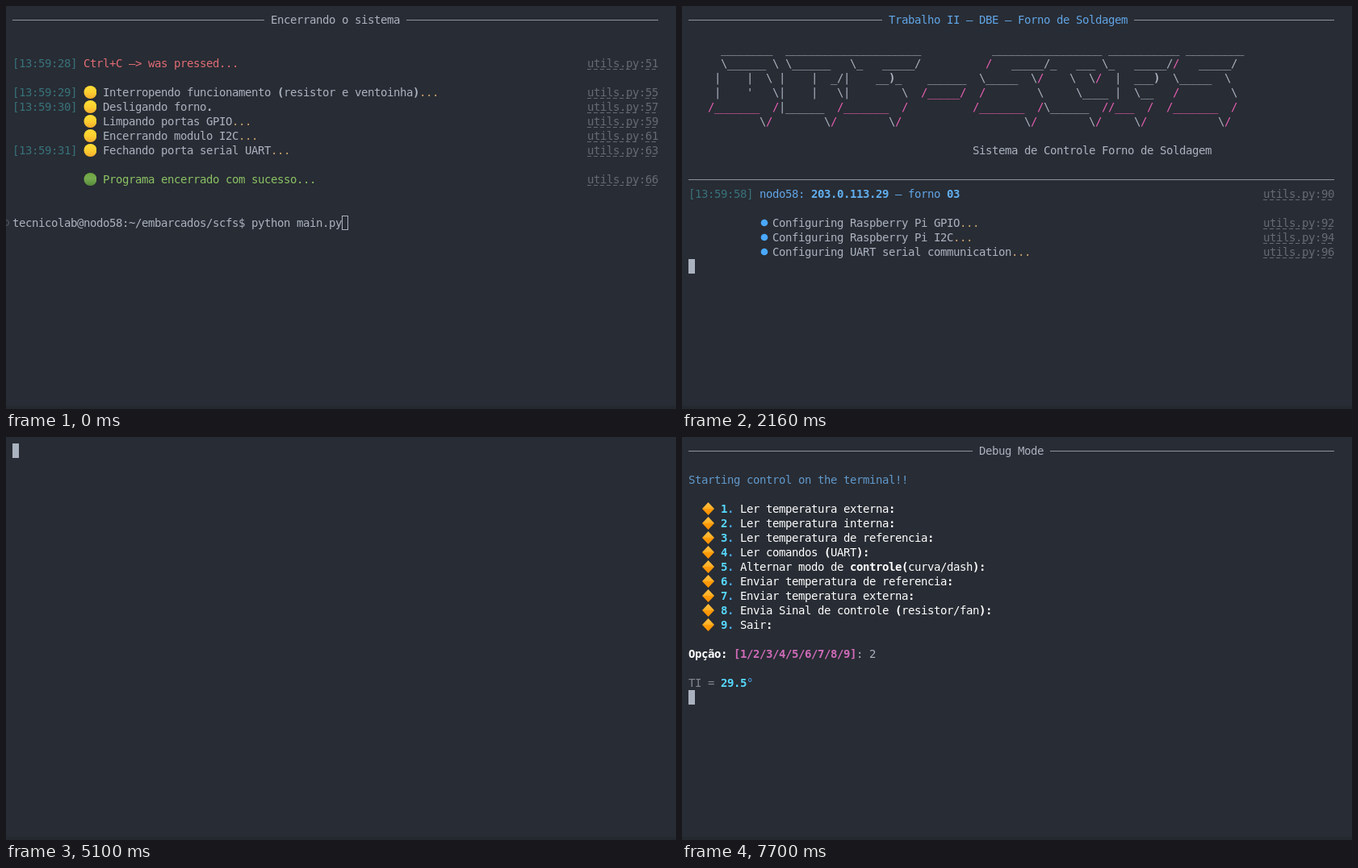
Recreate the animation shown at these times as an HTML page. Size 830 px wide and 500 px high, loop 8 s.

```html
<!DOCTYPE html>
<html lang="pt">
<head>
<meta charset="utf-8">
<title>Terminal</title>
<style>
html, body { margin: 0; width: 100%; height: 100%; overflow: hidden; background: #282c34; }
#term {
  position: absolute; left: 0; top: 0; width: 830px; height: 500px; overflow: hidden;
  color: #abb2bf; background: linear-gradient(#282c34 496px, #24282f 496px);
  font: 14px/18px "DejaVu Sans Mono", monospace;
}
#term > div { position: absolute; height: 18px; white-space: pre; letter-spacing: calc(8px - 1ch); }
#term .rule { height: 1px; background: #8d939d; }
#term .mark { left: -4px; top: 265px; width: 6px; height: 6px; border: 1px solid #59606c; border-radius: 50%; }
#cursor { width: 8px; background: #abb2bf; }
#cursor.hollow { background: none; box-shadow: inset 0 0 0 1px #abb2bf; }

.time { color: #38727b; }
.red { color: #e06c75; }
.green { color: #8cc265; }
.ready { color: #67b35c; }
.dots { color: #c9a26d; }
.blue { color: #61a5e6; }
.soft { color: #6199cb; }
.pink { color: #e85fb4; }
.white { color: #fff; }
.dim { color: #82868d; }
.bold, .ip, .ask, .key, .num, .opts { font-weight: bold; }
.ip { color: #61afef; }
.ask { color: #9aa1b0; }
.key, .num { color: #56d8ff; }
.deg { color: #4aa8f0; }
.opts { color: #cf6bb8; }
.file { color: #656a73; }
.link { color: #4da9fa; }
.dash {
  display: inline-block; height: 18px; vertical-align: top;
  background: repeating-linear-gradient(90deg, currentColor 0 5px, transparent 5px 8px) 0 16px / 100% 1px no-repeat;
}
i { display: inline-block; width: 16px; height: 18px; vertical-align: top; }
.ball { clip-path: circle(8px at 8.5px 9px); background: linear-gradient(#ffdc35 2px, #fdcf30 9px, #f4ad2c 17px); }
.leaf { clip-path: circle(8px at 8.5px 9px); background: linear-gradient(#6fa63f 2px, #77ab50 8px, #558a3a 17px); }
.gem { clip-path: polygon(8.5px 1px, 16px 9px, 8.5px 17px, 1px 9px); background: linear-gradient(#ffc247 1px, #ffae22 9px, #ff9c0a 9px, #f98f00 17px); }
.dot { clip-path: circle(4.3px at 6px 9px); background: #4aa8ff; }
.ok { clip-path: circle(4.3px at 6px 9px); background: #67b35c; }
</style>
</head>
<body>
<div id="term"></div>
<script>
const LOOP = 8000;
const term = document.getElementById('term');
const items = [];

// {class text} becomes a styled span, [[class]] an icon
const rich = s => s
  .replace(/\[\[(\w+)\]\]/g, '<i class="$1"></i>')
  .replace(/\{([a-z ]+):([^}]*)\}/g, '<span class="$1">$2</span>');

// spans: pairs of on and off times
function add(row, col, html, spans, cls = '') {
  const el = document.createElement('div');
  el.className = cls;
  el.style.left = 8 + col * 8 + 'px';
  el.style.top = 8 + row * 18 + 'px';
  el.innerHTML = html;
  term.append(el);
  items.push({ el, spans });
  return el;
}
const text = (row, col, s, ...spans) => add(row, col, rich(s), spans);

function line(row, from, to, spans) {
  const el = add(row, from, '', spans, 'rule');
  el.style.top = 17 + row * 18 + 'px';
  el.style.width = (to - from) * 8 + 'px';
}
function rule(row, title, cls, ...spans) {
  if (!title) return line(row, 0, 100, spans);
  const col = Math.floor((100 - title.length) / 2);
  line(row, 0, col - 1, spans);
  text(row, col, `{${cls}:${title}}`, ...spans);
  line(row, col + title.length + 1, 100, spans);
}
function log(row, time, s, num, ...spans) {
  if (time) text(row, 0, `{time:[13:59:${time}]}`, ...spans);
  text(row, 11, s.replace(/\.\.\.$/, '{dots:...}'), ...spans);
  text(row, 91 - String(num).length, `{file dash:utils.py}{file::}{file dash:${num}}`, ...spans);
}

// Shutdown screen
const A = [0, 1760];
rule(0, 'Encerrando o sistema', 'plain', ...[A]);
log(3, 28, '{red:Ctrl+C –> was pressed...}', 51, A);
log(5, 29, '[[ball]] Interropendo funcionamento {bold:(}resistor e ventoinha{bold:)}...', 55, A);
log(6, 30, '[[ball]] Desligando forno{bold:.}', 57, A);
log(7, '', '[[ball]] Limpando portas GPIO...', 59, A);
log(8, '', '[[ball]] Encerrando modulo I2C...', 61, A);
log(9, 31, '[[ball]] Fechando porta serial UART...', 63, A);
log(11, '', '[[leaf]] {green:Programa encerrado com sucesso...}', 66, A);
text(14, 0, 'tecnicolab@nodo58:~/embarcados/scfs$ python main.py', A);
add(0, 0, '', [A], 'mark').style.cssText = '';

// Setup screen
const END = 5100, B = [1840, END];
rule(0, 'Trabalho II – DBE – Forno de Soldagem', 'blue', B);
const art = String.raw`
     ________  _____________________           _________________ ___________ _________
     \______ \ \______   \_   _____/          /   _____/_   ___ \_   _____//   _____/
    |    |  \ |    |  _/|    __)_    ______  \_____  \/    \  \/  |  ___)  \_____  \
    |    '   \|    |   \|        \  /_____/  /        \     \____ |  \__   /        \
   /_______  /|______  /_______  /          /_______  /\______  //___  /  /_______  /
           \/        \/        \/                   \/        \/     \/           \/`;
art.split('\n').slice(1).forEach((s, i) => add(2 + i, 0, s
  .replace(/\B(?:\/[-\w.+]+)*\/[-\w.+]*|\)/g, m => `<span class="${m === ')' ? 'bold' : 'pink'}">${m}</span>`), [B]));
text(9, 44, 'Sistema de Controle Forno de Soldagem', B);
rule(11, '', '', B);
log(12, 58, '{blue:nodo58:} {ip:203.0.113.29} {blue:– forno} {ip:03}', 90, B);
log(14, '', '[[dot]]Configuring Raspberry Pi GPIO...', 92, [1930, END]);
log(15, '', '[[dot]]Configuring Raspberry Pi I2C...', 94, [2020, END]);
log(16, '', '[[dot]]Configuring UART serial communication...', 96, [2160, END]);
log(17, 59, '[[ok]]{ready:Ready setup...}', 98, [2340, END]);
log(19, '', '{link dash:link dashboad thingsboard}', 102, [2890, END]);
rule(20, '', '', [2890, END]);
text(22, 0, '{ask:> Modo de controle? }{key:[C]}{ask:urva }{key:[D]}{ask:ashboard }' +
  '{key:[T]}{ask:erminal }{opts:[c/d/t]}: ', [2970, END]);
text(22, 60, 't', [3890, END]);

// Menu screen, redrawn once
const C = [5170, LOOP], first = [5170, 6590], again = [6640, LOOP];
rule(0, 'Debug Mode', 'plain', C);
text(2, 0, '{soft:Starting control on the terminal!!}', C);
[
  'Ler temperatura externa',
  'Ler temperatura interna',
  'Ler temperatura de referencia',
  'Ler comandos {bold:(}UART{bold:)}',
  'Alternar modo de {bold:controle(}curva/dash{bold:)}',
  'Enviar temperatura de referencia',
  'Enviar temperatura externa',
  'Envia Sinal de controle {bold:(}resistor/fan{bold:)}',
  'Sair'
].forEach((s, i) => {
  const row = 4 + i, spans = i < 5 ? [C] : [first, again];
  text(row, 2, `[[gem]] {num:${i + 1}}{num deg:.} `, ...spans);
  text(row, 8, s + '{bold::}', ...spans).classList.add('white');
});
text(14, 0, '{white bold:Opção:} {opts:[1/2/3/4/5/6/7/8/9]}: ', first, again);
text(14, 28, '1', [5700, 6590]);
text(14, 28, '2', [7330, LOOP]);
text(16, 0, '{dim:TE =} {num:25.3}{deg:°}', [6140, 6590]);
text(16, 0, '{dim:TI =} {num:29.5}{deg:°}', [7700, LOOP]);

// Cursor: time, row, column
const moves = [
  [0, 14, 51], [760, 15, 0], [1760, 0, 0], [1840, 14, 0], [1930, 15, 0], [2020, 16, 0],
  [2160, 17, 0], [2340, 18, 0], [2890, 21, 0], [2970, 22, 60], [3890, 22, 61], [4030, 23, 0],
  [5100, 0, 0], [5170, 14, 28], [5700, 14, 29], [6030, 15, 0], [6085, 16, 0], [6140, 17, 0],
  [6540, 18, 0], [6590, 9, 0], [6640, 14, 28], [7330, 14, 29], [7540, 15, 0], [7620, 16, 0], [7700, 17, 0]
];
const cursor = document.createElement('div');
cursor.id = 'cursor';
term.append(cursor);

const start = performance.now();
function draw() {
  const t = (performance.now() - start) % LOOP;
  for (const { el, spans } of items)
    el.style.visibility = spans.some(([on, off]) => t >= on && t < off) ? 'visible' : 'hidden';
  const [, row, col] = moves.findLast(m => m[0] <= t);
  cursor.style.left = 8 + col * 8 + 'px';
  cursor.style.top = 8 + row * 18 + 'px';
  cursor.className = t < 430 ? 'hollow' : '';
  requestAnimationFrame(draw);
}
draw();
</script>
</body>
</html>
```
